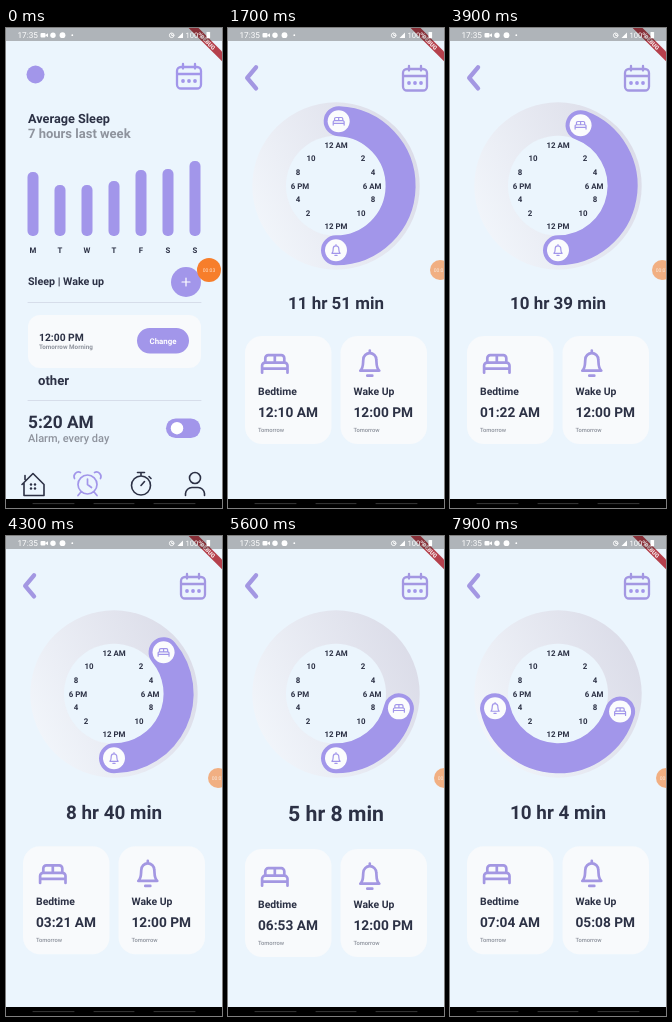
Animation, 216 px wide and 480 px high, one loop 8000 ms. Source, as an HTML page:

```html
<!DOCTYPE html>
<html lang="en">
<head>
<meta charset="utf-8">
<title>Sleep timer</title>
<style>
  html, body { margin: 0; width: 100%; height: 100%; overflow: hidden; background: #ebf5fd; }
  svg { display: block; width: 100vw; height: 100vh; }
  text { font-family: Roboto, "Noto Sans", sans-serif; text-rendering: geometricPrecision; }
  .line { fill: none; stroke-linecap: round; stroke-linejoin: round; }
</style>
</head>
<body>
<svg id="stage" viewBox="0 0 216 480">
  <defs>
    <linearGradient id="track" x1="0" y1=".75" x2="1" y2=".3">
      <stop offset="0" stop-color="#f2f6fb"/>
      <stop offset="1" stop-color="#dbdce8"/>
    </linearGradient>
  </defs>
  <g id="home"></g>
  <g id="timer"></g>
  <g id="system"></g>
</svg>
<script>
const LOOP = 8000, STEP = 100;
const BG = '#ebf5fd', PURPLE = '#a296ea', DARK = '#2c3145', GREY = '#8e939d', CARD = '#f8fafc';
const CX = 108, CY = 157.7, R = 64.6;
const TITLE = { width: 96, top: 265.2, size: 17, ascent: 0.93, lineHeight: 1.17 };
const $ = id => document.getElementById(id);

function add(parent, tag, attrs, text) {
  const el = document.createElementNS('http://www.w3.org/2000/svg', tag);
  for (const k in attrs) el.setAttribute(k, attrs[k]);
  if (text !== undefined) el.textContent = text;
  parent.appendChild(el);
  return el;
}
const rect = (p, x, y, width, height, rx, fill) => add(p, 'rect', { x, y, width, height, rx, fill });
const disc = (p, cx, cy, r, fill) => add(p, 'circle', { cx, cy, r, fill });
const line = (p, d, stroke, width) => add(p, 'path', { d, stroke, 'stroke-width': width, class: 'line' });
const group = (p, x = 0, y = 0, s = 1) => add(p, 'g', { transform: `translate(${x} ${y}) scale(${s})` });
function label(p, x, y, size, text, fill = DARK, weight = 700, anchor = 'start') {
  return add(p, 'text', { x, y, 'text-anchor': anchor, style: `font-size:${size}px;font-weight:${weight};fill:${fill}` }, text);
}

const BED = 'M-9.5-1V-5.5a3 3 0 0 1 3-3H6.5a3 3 0 0 1 3 3V-1M0-8.5V-1M-12.7 9V2a3 3 0 0 1 3-3H9.7a3 3 0 0 1 3 3V9M-12.7 5H12.7';
const BELL = 'M-9.5 7C-6 4-7-1-6.5-4a6.5 6.5 0 0 1 13 0C7-1 6 4 9.5 7ZM-2.5 12h5M0-13v2.5';

function calendar(p, x, y, color) {
  const g = group(p, x, y);
  line(g, 'M-8-9.5H8a4 4 0 0 1 4 4V8a4 4 0 0 1-4 4H-8a4 4 0 0 1-4-4V-5.5a4 4 0 0 1 4-4ZM-12-2.5H12M-6-12.5v4.5M6-12.5v4.5', color, 2.3);
  for (const dx of [-6, 0, 6]) disc(g, dx, 4.5, 1.9, color);
  return g;
}

function buildHome(p) {
  rect(p, 0, 0, 216, 480, 0, BG);
  disc(p, 29.5, 46.5, 9, PURPLE);
  calendar(p, 183, 48.5, PURPLE);
  label(p, 22, 95, 12.7, 'Average Sleep');
  label(p, 22, 110, 13, '7 hours last week', GREY);
  [144, 157, 157, 153, 142, 141, 133].forEach((top, i) => {
    const x = 27 + 27 * i;
    rect(p, x - 5.5, top, 11, 208 - top, 5, PURPLE);
    label(p, x, 225, 7.8, 'MTWTFSS'[i], DARK, 700, 'middle');
  });
  label(p, 22, 257, 10.7, 'Sleep | Wake up');
  disc(p, 180, 254, 15, PURPLE);
  line(p, 'M176 254h8M180 250v8', '#fff', 1.2);
  line(p, 'M22 274.5H195M22 372.5H195', '#d6ddea', 1);

  rect(p, 22, 287, 173, 53, 12, CARD);
  label(p, 33, 313, 10.3, '12:00 PM');
  label(p, 33, 320.8, 6.3, 'Tomorrow Morning', GREY);
  rect(p, 131, 300, 52, 25.5, 12.7, PURPLE);
  label(p, 157, 315.5, 7.9, 'Change', '#fff', 700, 'middle');
  label(p, 32, 357, 13.1, 'other');

  label(p, 22, 400, 17.3, '5:20 AM');
  label(p, 22, 414, 11, 'Alarm, every day', GREY, 500);
  rect(p, 160, 390.5, 34.5, 19.5, 9.7, PURPLE);
  disc(p, 171, 400.2, 6.2, '#fff');

  const house = group(p, 27, 456.5);
  line(house, 'M-11 0L0-11L11 0M-9-2V11H11V0M-8-5V-9', DARK, 1.6);
  for (const [x, y] of [[-2, 0], [2, 0], [-2, 4], [2, 4]]) disc(house, x, y, 1.2, DARK);
  const alarm = group(p, 81.5, 456.5);
  line(alarm, 'M9.5 0a9.5 9.5 0 1 1-19 0a9.5 9.5 0 1 1 19 0M0-5.5V0L4 3M-13-6a4.5 4.5 0 0 1 6-6M13-6a4.5 4.5 0 0 0-6-6M-7 8L-9.5 11M7 8L9.5 11', PURPLE, 1.7);
  const watch = group(p, 135, 457.5);
  line(watch, 'M9.5 0a9.5 9.5 0 1 1-19 0a9.5 9.5 0 1 1 19 0M-3.5-13h7M0-13v3M8-9l2 2M0 0L3.5-4', DARK, 1.6);
  const person = group(p, 189, 456.5);
  line(person, 'M5.5-6.5a5.5 5.5 0 1 1-11 0a5.5 5.5 0 1 1 11 0M-9.5 11V9a6.5 6.5 0 0 1 6.5-6H3a6.5 6.5 0 0 1 6.5 6V11', DARK, 1.6);
}

function handle(p, icon) {
  const g = group(p);
  disc(g, 0, 0, 11, '#fbfcfd');
  line(group(g, 0, 0, 0.43), icon, PURPLE, 2.8);
  return g;
}

function buildTimer(p) {
  const ui = { tinted: [] };
  rect(p, 0, 0, 216, 480, 0, BG);
  ui.tinted.push(line(p, 'M28 39.3L19.2 49.8L28 60.3', PURPLE, 4.4));
  ui.tinted.push(...calendar(p, 187, 50.5, PURPLE).querySelectorAll('path'));

  disc(p, CX, CY + 0.3, 83.7, 'url(#track)');
  disc(p, CX, CY, 50, BG);
  ui.arc = line(p, '', PURPLE, 30);
  const hours = [['12 AM', 108, 117], ['2', 135, 130], ['4', 145, 144], ['6 AM', 144, 158],
    ['8', 145, 171], ['10', 133, 185], ['12 PM', 108, 198], ['2', 80, 185],
    ['4', 70, 171], ['6 PM', 72, 158], ['8', 70, 144], ['10', 83, 130]];
  for (const [s, x, y] of hours) label(p, x, y + 2.8, 7.9, s, DARK, 700, 'middle');
  ui.bed = handle(p, BED);
  ui.bell = handle(p, BELL);

  ui.total = label(p, 108, 281, TITLE.size, '', DARK, 700, 'middle');
  ui.cards = group(p);
  const card = (x, tx, title, icon, ix) => {
    rect(ui.cards, x, 308, 86.5, 108, 17, CARD);
    ui.tinted.push(line(group(ui.cards, ix, 335.7), icon, PURPLE, 2.7));
    label(ui.cards, tx, 367.3, 10.4, title);
    label(ui.cards, tx, 404, 5.8, 'Tomorrow', GREY, 500);
    return label(ui.cards, tx, 389, 13.7, '');
  };
  ui.bedTime = card(17, 30, 'Bedtime', BED, 46.8);
  ui.wakeTime = card(112.5, 125.5, 'Wake Up', BELL, 141.8);
  return ui;
}

function buildSystem(p) {
  const ui = {};
  const banner = add(p, 'g', { transform: 'translate(201.8 14.2) rotate(45)' });
  rect(banner, -28, -3.5, 56, 7, 0, '#b5404c');
  label(banner, 0, 2.1, 5.8, 'DEBUG', '#f4e4e6', 900, 'middle');
  rect(p, 0, 0, 216, 13, 0, 'rgba(12,6,0,.27)');
  label(p, 11.5, 10, 8.2, '17:35', '#fff', 400);
  rect(p, 34.5, 5, 5, 4.5, 1, '#fff');
  add(p, 'path', { d: 'M39 7.2l3-2v4z', fill: '#fff' });
  disc(p, 47, 7.2, 2.7, '#fff');
  disc(p, 56.5, 7.2, 2.9, '#fff');
  disc(p, 66.3, 7.2, 0.9, '#fff');
  line(p, 'M168 7.3a2.3 2.3 0 1 1-4.6 0a2.3 2.3 0 1 1 4.6 0M165.7 6v1.5h1', '#fff', 0.9);
  add(p, 'path', { d: 'M171.5 10h5.5v-5.5z', fill: '#fff' });
  label(p, 179.5, 10, 7.6, '100%', '#fff', 400);
  rect(p, 200.5, 4, 3.6, 6.2, 0.6, '#fff');
  rect(p, 0, 471, 216, 9, 0, '#000');
  line(p, 'M27 475.6H68M88 475.6H128M148 475.6H189', '#383838', 1);

  ui.bubble = group(p);
  ui.ball = disc(ui.bubble, 0, 0, 12, '#f77e2b');
  ui.clock = label(ui.bubble, 0, 1.8, 5, '', '#ffe3cc', 400, 'middle');
  return ui;
}

buildHome($('home'));
const timer = buildTimer($('timer'));
const system = buildSystem($('system'));

// Piecewise-linear value through [time, value] points.
function track(points, t) {
  if (t <= points[0][0]) return points[0][1];
  for (let i = 1; i < points.length; i++) {
    const [t0, a] = points[i - 1], [t1, b] = points[i];
    if (t <= t1) return a + (b - a) * (t - t0) / (t1 - t0);
  }
  return points[points.length - 1][1];
}

const FADE = [[900, 0], [1000, 0.4], [1100, 0.7], [1200, 0.87], [1300, 0.94], [1700, 1]];
const BED_MIN = [[3600, 9.5], [3700, 22.5], [4300, 200.5], [4500, 251.5], [4600, 270.5],
  [5400, 404.5], [5600, 412.5], [5900, 422.5], [6300, 422.5], [6400, 424]];
const WAKE_MIN = [[6900, 720], [7000, 746], [7100, 746], [7200, 782], [7900, 1028]];
const BUBBLE_X = [[100, 203], [500, 205], [1200, 205], [1700, 212], [5400, 212], [5600, 216]];
const BUBBLE_ALPHA = [[100, 1], [500, 0.9], [1000, 0.9], [1200, 0.65], [1700, 0.58]];
const BUBBLE_R = [[1200, 12], [1700, 10]];

const pad = n => String(n).padStart(2, '0');
function clock(min) {
  const m = Math.ceil(min), h = Math.floor(m / 60);
  return `${pad(h % 12 || 12)}:${pad(m % 60)} ${h < 12 ? 'AM' : 'PM'}`;
}
function dialPoint(min) {
  const a = min / 1440 * 2 * Math.PI;
  return [CX + R * Math.sin(a), CY - R * Math.cos(a)];
}
const move = (el, x, y) => el.setAttribute('transform', `translate(${x} ${y})`);

// Sets the total at the font size that fills its box; returns that size.
function fitTotal(text) {
  const el = timer.total;
  el.textContent = text;
  el.style.fontSize = TITLE.size + 'px';
  const size = TITLE.size * TITLE.width / (el.getComputedTextLength() || TITLE.width);
  el.style.fontSize = size + 'px';
  el.setAttribute('y', TITLE.top + TITLE.ascent * size);
  return size;
}

function draw(t) {
  const bed = track(BED_MIN, t), wake = track(WAKE_MIN, t);
  const from = dialPoint(bed), to = dialPoint(wake);
  const span = Math.ceil(wake - bed);

  $('timer').setAttribute('opacity', track(FADE, t));
  const tint = track([[1200, 0], [1700, 1]], t);
  const mix = (a, b) => Math.round(a + (b - a) * tint);
  const color = `rgb(${mix(124, 163)},${mix(111, 151)},${mix(200, 226)})`;
  for (const el of timer.tinted) el.setAttribute('stroke', color);

  timer.arc.setAttribute('d', `M${from}A${R} ${R} 0 ${span > 720 ? 1 : 0} 1 ${to}`);
  move(timer.bed, ...from);
  move(timer.bell, ...to);
  const size = fitTotal(`${Math.floor(span / 60)} hr ${span % 60} min`);
  // A taller total pushes the cards down.
  move(timer.cards, 0, (size - TITLE.size) * TITLE.lineHeight);
  timer.bedTime.textContent = clock(bed);
  timer.wakeTime.textContent = clock(wake);

  move(system.bubble, track(BUBBLE_X, t), 242);
  system.bubble.setAttribute('opacity', track(BUBBLE_ALPHA, t));
  system.ball.setAttribute('r', track(BUBBLE_R, t));
  system.clock.textContent = t < 1000 ? '00:03' : t < 3200 ? '00:05' : '00:07';
}

const start = performance.now();
function tick() {
  const t = (performance.now() - start) % LOOP;
  draw(Math.floor(t / STEP) * STEP);
  requestAnimationFrame(tick);
}
tick();
</script>
</body>
</html>
```
